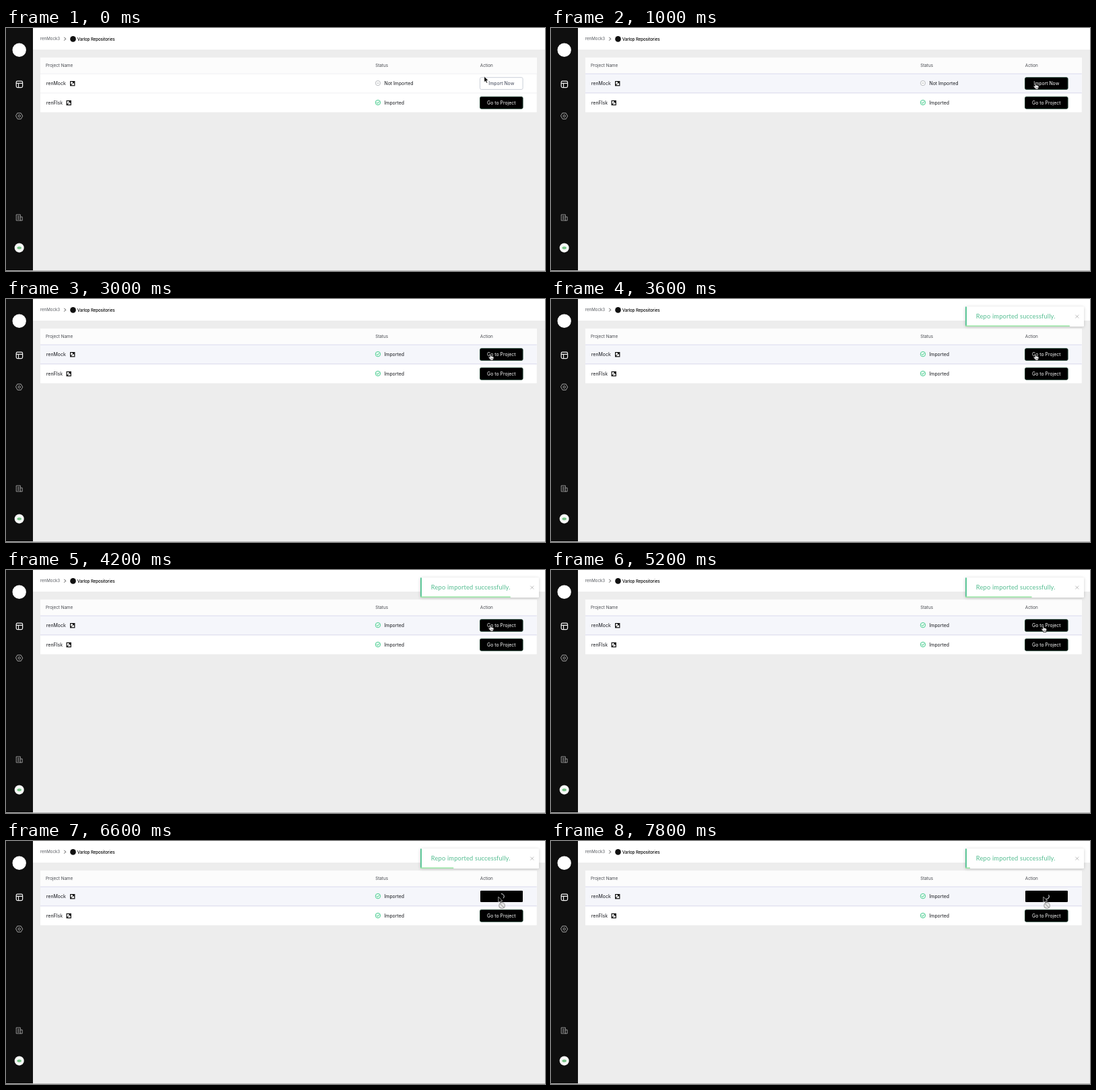
An HTML page that plays this animation: 800x362 px, repeating every 8 s.

```html
<!DOCTYPE html>
<html lang="en">
<head>
<meta charset="utf-8">
<title>Repositories</title>
<style>
html, body { margin: 0; width: 100%; height: 100%; overflow: hidden; background: #ededed; }
svg { display: block; width: 100vw; height: 100vh; }
text { font-family: Inter, "Open Sans", sans-serif; font-size: 6.9px; fill: #16181d; }
.head { font-size: 6.3px; fill: #44474d; }
.name { font-size: 7px; }
.line { fill: none; stroke-linecap: round; stroke-linejoin: round; }
.toast { font-family: Lato, sans-serif; font-size: 9.3px; letter-spacing: .17px; fill: #55bd91; }
</style>
</head>
<body>
<svg id="stage" viewBox="0 0 800 362" preserveAspectRatio="none"></svg>
<script>
const LOOP = 8000, STEP = 200;
const stage = document.getElementById('stage');

const rect = (x, y, w, h, fill, extra = '') =>
  `<rect x="${x}" y="${y}" width="${w}" height="${h}" fill="${fill}" ${extra}/>`;
const circle = (x, y, r, fill, extra = '') =>
  `<circle cx="${x}" cy="${y}" r="${r}" fill="${fill}" ${extra}/>`;
const line = (d, color, width = 1) =>
  `<path class="line" d="${d}" stroke="${color}" stroke-width="${width}"/>`;
const text = (x, y, s, cls = '', extra = '') =>
  `<text x="${x}" y="${y}" class="${cls}" ${extra}>${s}</text>`;
const group = (id, body, x = 0, y = 0) =>
  `<g id="${id}" transform="translate(${x} ${y})">${body}</g>`;

const linkIcon = (x, y) =>
  rect(x + .6, y + .6, 6.2, 6.2, '#fff', 'stroke="#111" stroke-width="1.2"') +
  `<path d="M${x + 3.1} ${y + 1}h3.4v3.4zM${x + 1} ${y + 4.2}l2.3 2.2h-2.3z" fill="#111"/>` +
  line(`M${x + 2.3} ${y + 5}l2.7-2.7`, '#111', .9);

const done = y =>
  circle(552, y, 3.7, '#e9fbf2', 'stroke="#3fc98b" stroke-width=".9"') +
  line(`M550.2 ${y + .1}l1.3 1.3 2.4-2.6`, '#2fbd7c', .9) +
  text(561.5, y + 2.6, 'Imported');

const pending = y =>
  circle(552, y, 3.6, '#fff', 'stroke="#a9abb0" stroke-width=".8"') +
  line(`M550.6 ${y}h2.8`, '#a9abb0', .8) +
  text(561.5, y + 2.6, 'Not Imported');

const button = (y, label, dark) =>
  rect(703.5, y, 63.6, 17.8, dark ? '#000' : '#fff',
    `rx="2" stroke="${dark ? '#1d4030' : '#c6cad4'}" stroke-width=".9"`) +
  text(735.3, y + 11.6, label, '', `text-anchor="middle" style="fill:${dark ? '#fff' : '#3f4658'}"`);

const sidebar =
  rect(0, 0, 40, 362, '#0f0f0f') +
  circle(19.7, 32.7, 10.2, '#fff') +
  `<rect x="15.2" y="79.2" width="9.4" height="9.4" rx="1.8" class="line" stroke="#f4f4f4" stroke-width="1.2"/>` +
  line('M15.4 82.4h9M18.6 82.5v6', '#f4f4f4', 1.1) +
  line('M17.2 126.8h5l2.5 4.4-2.5 4.4h-5l-2.5-4.4z', '#b4b4b4', .9) +
  circle(19.7, 131.2, 1.7, 'none', 'stroke="#b4b4b4" stroke-width=".9"') +
  line('M15.6 278h5.8v8.8h-5.8zM21.4 281.4h2.8v5.4h-2.8M17.3 280.4h2.3M17.3 282.5h2.3M17.3 284.6h2.3', '#b4b4b4', .8) +
  circle(19.7, 327.4, 7, '#f8faf8') +
  `<ellipse cx="19.7" cy="327.6" rx="3.2" ry="2" fill="#7ac58a"/>`;

const header =
  rect(40, 0, 760, 33, '#fff') +
  rect(40, 32.5, 760, .8, '#e4e4e4') +
  text(50.8, 18.4, 'renMock3', '', 'style="font-size:6.15px;fill:#55585e"') +
  line('M86.6 14.1l2.1 2.1-2.1 2.1', '#333', .9) +
  circle(99.5, 16.4, 4.3, '#111') +
  text(105.8, 18.5, 'Varlop Repositories', '',
    'style="font-size:6.1px;font-weight:500;letter-spacing:-.06px;fill:#000"');

const table =
  rect(51, 44, 736.7, 81.4, '#fff') +
  rect(51, 44, 736.7, 24, '#fcfcfc') +
  rect(51, 67.8, 736.7, .8, '#ececee') +
  rect(51, 96.5, 736.7, .8, '#ececee') +
  text(59, 58.4, 'Project Name', 'head') +
  text(548.2, 58.4, 'Status', 'head') +
  text(703.8, 58.4, 'Action', 'head') +
  group('hover', rect(51, 68, 736.7, 29, '#f5f6fb') +
    rect(51, 67.7, 736.7, 1, '#dcdcee') + rect(51, 96.2, 736.7, 1, '#dcdcee')) +
  text(59.8, 85.2, 'renMock', 'name') + linkIcon(95, 79) +
  text(59.8, 114, 'renFIsk', 'name') + linkIcon(89.5, 107.8) +
  group('pending', pending(82.1)) +
  group('done', done(82.1)) +
  done(111) +
  group('importLight', button(73.7, 'Import Now', false)) +
  group('importDark', button(73.7, 'Import Now', true)) +
  group('open', button(73.7, 'Go to Project', true)) +
  group('busy', rect(704, 74, 63, 17, '#000', 'rx="1.2"') +
    `<path id="spin" class="line" d="M735.3 78.6a4 4 0 0 1 3.2 6.4" stroke="#dfe2e6" stroke-width="1"/>`) +
  button(102.5, 'Go to Project', true);

const toast = group('toast',
  rect(615, 11.5, 176, 29.5, '#fff', 'rx="1.5" filter="url(#shadow)"') +
  rect(615, 11.5, 2, 29.5, '#5cc698') +
  text(630.8, 29.4, 'Repo imported successfully.', 'toast') +
  line('M778.6 23.9l4.4 4.4M783 23.9l-4.4 4.4', '#a5a5a5', .7) +
  rect(615, 39.4, 176, 1.6, '#9be5a6', 'id="bar"'));

const arrowPath = 'M0 0v8.4l1.9-1.7 1.4 3.1 1.5-.7-1.4-3h2.7z';
const handPath = 'M-1 .7c0-1 1.5-1 1.6 0l.3 2.7c.4-.6 1.3-.5 1.5.2.5-.4 1.2-.2 1.4.4.6-.2 1.2.1 1.2.8 ' +
  '0 1.6-.3 2.4-.9 3.4v1.2h-4.2v-1c-.9-1-1.6-2.1-2.6-3.2-.5-.7.4-1.5 1.1-.9l.8.7z';
const cursor = group('cursor',
  group('arrow', `<path d="${arrowPath}" fill="#000" stroke="#fff" stroke-width=".6"/>`) +
  group('hand', `<path d="${handPath}" fill="#fff" stroke="#000" stroke-width=".7"/>` +
    line('M.8 6v2M2.1 6v2M3.3 6v2', '#000', .4)) +
  group('denied', circle(5.3, 13, 4.3, '#e6e6e6', 'stroke="#a6a6a6" stroke-width="1.2"') +
    line('M2.4 10.1l5.8 5.8', '#a6a6a6', 1.2)));

stage.innerHTML =
  `<defs><filter id="shadow" x="-10%" y="-30%" width="120%" height="170%">
    <feDropShadow dx="0" dy=".6" stdDeviation="2" flood-opacity=".2"/></filter></defs>` +
  rect(0, 0, 800, 362, '#ededed') + header + table + sidebar +
  rect(0, 361, 800, 1, '#b9b9b9') + toast + cursor;

const el = id => document.getElementById(id);
const show = (id, on) => el(id).setAttribute('display', on ? 'inline' : 'none');
const ease = (t, a, b) => {
  const p = Math.min(1, Math.max(0, (t - a) / (b - a)));
  return p * p * (3 - 2 * p);
};

function draw(t) {
  const importing = t >= 1800 && t < 3000;
  const opening = t >= 5600;
  const busy = importing || opening;
  const imported = t >= 3000;
  const onButton = t >= 600;

  show('hover', t >= 200);
  show('pending', !imported);
  show('done', imported);
  show('importLight', !onButton);
  show('importDark', onButton && t < 1800);
  show('open', imported && !opening);
  show('busy', busy);

  // The first spinner stalls before the import finishes.
  const spinTime = importing ? Math.min(t, 2200) : t;
  el('spin').setAttribute('transform', `rotate(${(spinTime - 6600) * .35} 735.3 82.6)`);

  show('toast', t >= 3600);
  el('bar').setAttribute('width', 176 * Math.min(1, Math.max(0, (LOOP - t) / 5000)));

  const enter = ease(t, 0, 1000), slide = ease(t, 4600, 5200);
  const x = 709.8 + 9.2 * enter + 11.8 * slide;
  const y = 72.2 + 9.8 * enter + 1.2 * slide;
  el('cursor').setAttribute('transform', `translate(${x} ${y})`);
  show('arrow', !onButton || busy);
  show('hand', onButton && !busy);
  show('denied', busy);
}

function tick() {
  const t = performance.now() % LOOP;
  draw(Math.floor(t / STEP) * STEP);
  requestAnimationFrame(tick);
}
tick();
</script>
</body>
</html>
```
